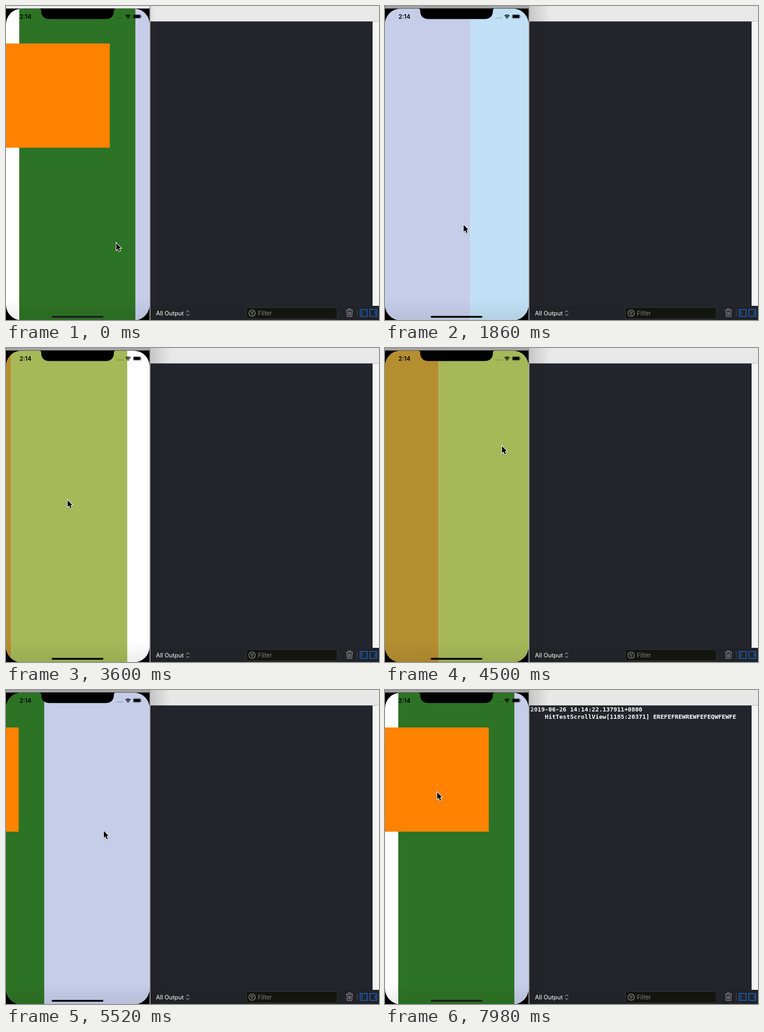
These frames come from a looping animation (816x687 px, 8000 ms). An HTML page with a canvas:

```html
<!DOCTYPE html>
<html lang="en">
<head>
<meta charset="utf-8">
<title>Scroll view hit test</title>
<style>
html, body { margin: 0; width: 100%; height: 100%; overflow: hidden; background: #24242c; }
canvas { display: block; }
</style>
</head>
<body>
<canvas id="stage" width="816" height="687"></canvas>
<script>
const ctx = document.getElementById('stage').getContext('2d');
const LOOP = 8000, STEP = 60, PAGE = 254, SETTLE = 450;
const PAGES = ['#2d7325', '#c5cde9', '#c1e0f5', '#b58e30', '#a6b858'];
const UI = 'Inter, "Open Sans", sans-serif';

// Swipe start times; forward swipes past the last page only bounce.
const FORWARD = [900, 1717, 1930, 2386, 2920, 3440];
const BACK = [4365, 4684, 5055, 5420];
const TAP = 7700;

// Slow drift of the hand (time, x, y); swipes swing the pointer around it.
const HAND = [[0, 240.5, 517], [1860, 235, 477], [2580, 191.5, 473], [4500, 189, 213],
  [5040, 171, 260], [6300, 87.5, 403], [TAP, 113.5, 222], [LOOP, 113.5, 222]];

const clamp = u => Math.min(1, Math.max(0, u));
const smooth = u => u * u * (3 - 2 * u);
const settle = u => 1 - (1 - u) ** 3 * (1 + 3 * u);
const bump = u => Math.sin(Math.PI * clamp(u)) ** 2;
const sum = (list, fn) => list.reduce((total, item, i) => total + fn(item, i), 0);

function scrollAt(t) {
  const progress = start => clamp((t - start) / SETTLE);
  const ahead = sum(FORWARD, (start, i) =>
    i < PAGES.length - 1 ? PAGE * settle(progress(start)) : 22 * bump(progress(start)));
  return ahead - sum(BACK, start => PAGE * settle(progress(start)));
}

function pointerAt(t) {
  const i = HAND.findIndex(point => point[0] > t);
  const [t0, x0, y0] = HAND[i - 1], [t1, x1, y1] = HAND[i];
  const u = smooth((t - t0) / (t1 - t0));
  const swing = start => 70 * bump((t - start + 60) / 340);
  return [x0 + (x1 - x0) * u + sum(BACK, swing) - sum(FORWARD, swing), y0 + (y1 - y0) * u];
}

const isPressed = t => [...FORWARD, ...BACK, TAP].some(start => t >= start - 20 && t < start + 100);

function rect(x, y, w, h, color) {
  ctx.fillStyle = color;
  ctx.fillRect(x, y, w, h);
}

function rounded(x, y, w, h, r, fill, stroke) {
  ctx.beginPath();
  ctx.roundRect(x, y, w, h, r);
  if (fill) { ctx.fillStyle = fill; ctx.fill(); }
  if (stroke) { ctx.strokeStyle = stroke; ctx.stroke(); }
}

function text(str, x, y, font, color) {
  ctx.font = font;
  ctx.fillStyle = color;
  ctx.fillText(str, x, y);
}

function strokePath(d, color, width) {
  ctx.strokeStyle = color;
  ctx.lineWidth = width;
  ctx.stroke(new Path2D(d));
}

function fade(x0, y0, x1, y1, from, to) {
  const gradient = ctx.createLinearGradient(x0, y0, x1, y1);
  gradient.addColorStop(0, from);
  gradient.addColorStop(1, to);
  return gradient;
}

function drawConsole(t, focus) {
  rect(316, 0, 500, 33, '#e8e8e8');
  rect(316, 33, 500, 1, '#b4b4b4');
  rect(316, 34, 486, 622, '#24242c');
  rect(802, 34, 14, 622, '#f5f4f5');
  rect(316, 656, 500, 31, '#222328');

  if (t >= TAP + 100) {
    const mono = 'bold 13.14px "DejaVu Sans Mono", monospace';
    text('2019-06-26 14:14:22.137911+0800', 318, 47, mono, '#fff');
    text('HitTestScrollView[1185:20371] EREFEFREWREWFEFEQWFEWFE', 349.6, 63, mono, '#fff');
  }

  const shade = `rgba(25,25,25,${0.06 + 0.1 * focus})`;
  rect(316, 0, 60, 687, fade(316, 0, 326 + 34 * focus, 0, shade, 'rgba(25,25,25,0)'));

  text('All Output', 328, 676.5, '500 12.8px ' + UI, '#dfdfe0');
  strokePath('M394 670l3.5-3.5 3.5 3.5M394 674l3.5 3.5 3.5-3.5', '#98989b', 1.2);

  ctx.lineWidth = 1;
  rounded(526, 659.5, 199, 25, 4, '#14150f', '#3d3d3f');
  strokePath('M531.5 672a7 7 0 1 0 14 0a7 7 0 1 0-14 0M534.5 669.5h8M535.5 672.5h6M537 675.5h3', '#b3b3b3', 1.1);
  text('Filter', 551, 676.5, '13px ' + UI, '#828284');

  strokePath('M744 665.5h15M749 665v-2.5h5v2.5M745.5 666l1 13.5h10l1-13.5M749 668.5l.4 8.5M751.5 668.5v8.5M754 668.5l-.4 8.5', '#a3a3a5', 1.1);
  rect(768, 664, 1, 15, '#4b4b50');
  for (const [x, bar] of [[774, 778], [795, 807]]) {
    ctx.lineWidth = 2;
    rounded(x + 1, 664, 15, 15, 0, null, '#1859ac');
    rect(bar, 667, 2, 9, '#1859ac');
  }
}

function drawStatusBar() {
  text('2:14', 29.5, 27.5, '600 12.8px ' + UI, '#000');
  for (let i = 0; i < 4; i++) rounded(242.5 + i * 3.8, 25, 2.4, 2.4, 1.2, 'rgba(0,0,0,.28)');
  strokePath('M261.5 21.8q5.5-4.6 11 0M263.5 24.2q3.5-3 7 0', '#000', 1.8);
  ctx.fillStyle = '#000';
  ctx.fill(new Path2D('M264.9 25.8q2.1-1.5 4.2 0l-2.1 2.2z'));
  ctx.lineWidth = 0.8;
  rounded(277.8, 18.4, 17.6, 9, 2.6, null, 'rgba(0,0,0,.45)');
  rounded(279, 19.5, 15.2, 6.8, 1.4, '#000');
  rect(296.2, 21.5, 1, 3, 'rgba(0,0,0,.45)');
}

function drawPhone(scroll, focus) {
  const bar = Math.round(236 - 72 * focus);
  rect(0, 0, 314, 6, `rgb(${bar},${bar},${bar})`);
  rect(314, 0, 2, 687, '#a1a1a3');
  rect(0, 5.5, 314, 682, '#000');

  ctx.save();
  ctx.beginPath();
  ctx.roundRect(0, 6, 314, 681.5, 34);
  ctx.clip();
  rect(0, 6, 314, 682, '#fff');
  const left = 29 - scroll;
  PAGES.forEach((color, i) => rect(left + i * PAGE, 6, PAGE, 682, color));
  rect(left - 30, 82, 228, 228, '#ff8200');
  rect(0, 640, 314, 47, fade(0, 640, 0, 687, 'rgba(0,0,0,0)', 'rgba(0,0,0,.07)'));
  drawStatusBar();
  rounded(100, 678, 113, 4, 2, scroll < 100 ? '#1d1d1d' : '#000');
  ctx.restore();

  ctx.fillStyle = '#000';
  ctx.fill(new Path2D('M72 5.5q5 0 5 5q0 18 19 18h121q19 0 19-18q0-5 5-5z'));
}

function drawPointer(t) {
  const [x, y] = pointerAt(t);
  if (isPressed(t)) {
    ctx.beginPath();
    ctx.arc(x, y + 1, 25, 0, 2 * Math.PI);
    ctx.strokeStyle = '#000';
    ctx.lineWidth = 1.8;
    ctx.stroke();
  }
  ctx.save();
  ctx.translate(x, y);
  const arrow = new Path2D('M.7 1.8V17L4.2 13.7L6.7 19.8L9.2 18.8L6.8 12.8H11.3z');
  ctx.shadowColor = 'rgba(0,0,0,.3)';
  ctx.shadowBlur = 2;
  ctx.shadowOffsetY = 1;
  ctx.strokeStyle = '#fff';
  ctx.lineWidth = 2.4;
  ctx.stroke(arrow);
  ctx.shadowColor = 'transparent';
  ctx.fillStyle = '#000';
  ctx.fill(arrow);
  ctx.restore();
}

function draw(now) {
  const t = Math.floor(now % LOOP / STEP) * STEP;
  const focus = clamp((t - 780) / 180);
  ctx.clearRect(0, 0, 816, 687);
  drawConsole(t, focus);
  drawPhone(scrollAt(t), focus);
  drawPointer(t);
  requestAnimationFrame(draw);
}
requestAnimationFrame(draw);
</script>
</body>
</html>
```
